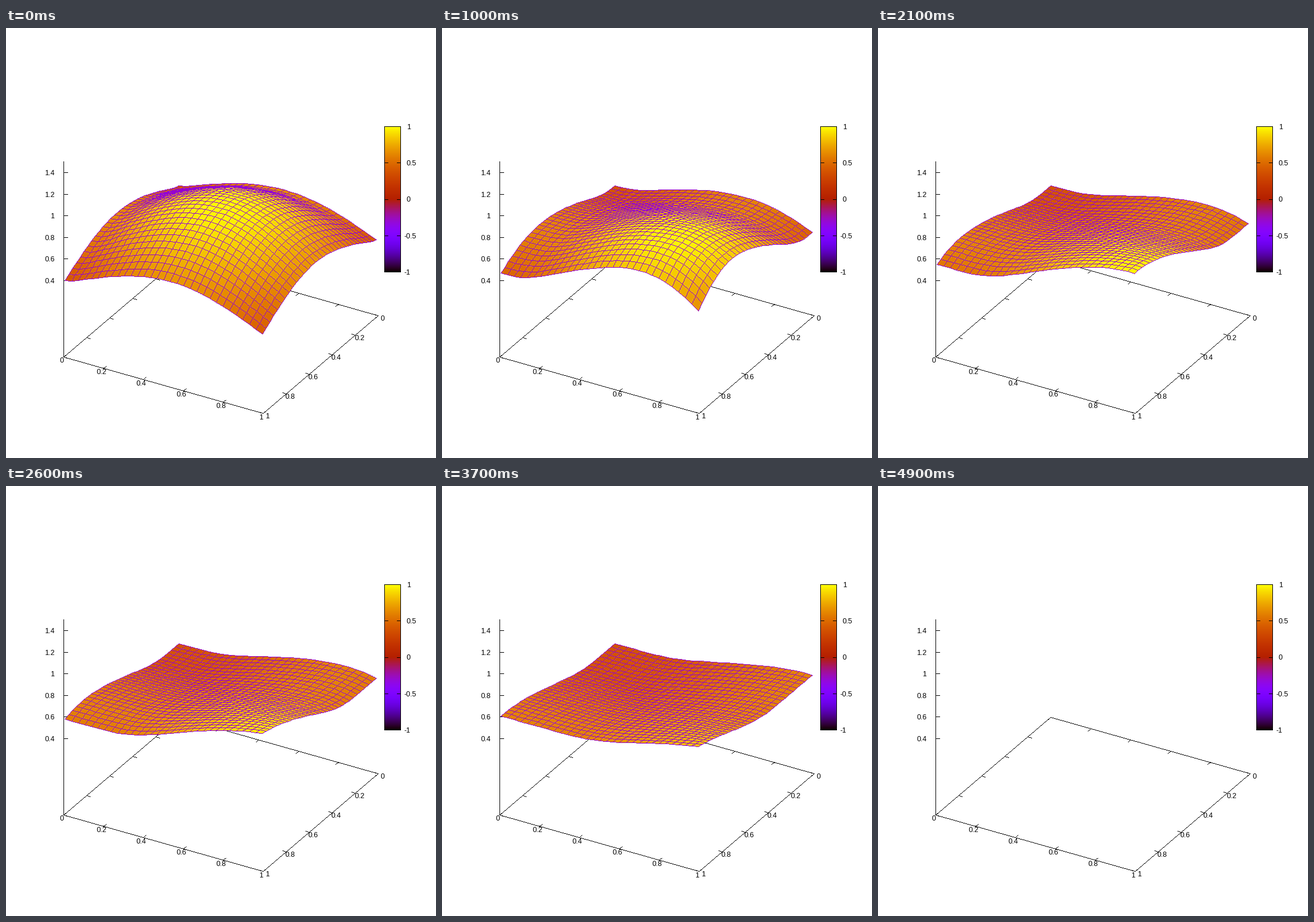
Animation of 748 by 748 pixels, one loop 5000 ms. Source, as a matplotlib script:

```python
import numpy as np
import matplotlib.pyplot as plt
from matplotlib.animation import FuncAnimation
from matplotlib.collections import PathCollection
from matplotlib.patches import PathPatch
from matplotlib.path import Path

SIZE, DPI = 748, 100
PX = 72 / DPI
FRAMES, INTERVAL = 50, 100

# Oblique view: screen position of the base corner and of the unit vectors
ORIGIN = np.array([300.4, 402.0])
X_VEC = np.array([346.9, 98.1])
Y_VEC = np.array([-200.3, 170.0])
Z_BASE, Z_SCALE = -0.308, 187.8

CELLS, DX, DT = 30, 0.033, 0.02
LEAD_STEPS = 2
MESH_COLOR = (148 / 255, 0, 211 / 255)

SQUARE = 0.3 * np.array([[-1, -1], [1, -1], [1, 1], [-1, 1], [-1, -1]])
SQUARE_CODES = [Path.MOVETO] + [Path.LINETO] * 3 + [Path.CLOSEPOLY]


def project(x, y, z=Z_BASE):
    x, y, z = np.broadcast_arrays(x, y, z)
    point = ORIGIN + x[..., None] * X_VEC + y[..., None] * Y_VEC
    point[..., 1] -= (z - Z_BASE) * Z_SCALE
    return point


def palette(value):
    """Black - violet - red - yellow ramp over -1..1."""
    t = np.clip((np.asarray(value) + 1) / 2, 0, 1)
    blue = np.clip(np.sin(2 * np.pi * t), 0, 1)
    return np.stack([np.sqrt(t), t**3, blue], axis=-1)


def advance(u):
    """One upwind step of the two-dimensional Burgers equation."""
    slope = np.diff(u, axis=0, prepend=u[:1]) + np.diff(u, axis=1, prepend=u[:, :1])
    return u - DT / DX * u * slope


def trace(start, end):
    """Whole pixels on straight lines, with a mask of the ones in use."""
    start, end = np.rint(start), np.rint(end)
    span = np.abs(end - start).max(axis=-1)[..., None]
    steps = np.arange(int(span.max()) + 1)
    t = np.minimum(steps / np.maximum(span, 1), 1)[..., None]
    pixels = np.rint(start[..., None, :] + t * (end - start)[..., None, :])
    return pixels, steps <= span


def pixel_path(pixels):
    squares = pixels[:, None, :] + SQUARE
    return Path(squares.reshape(-1, 2), SQUARE_CODES * len(pixels))


def cell_corners(a):
    return np.stack([a[:-1, :-1], a[1:, :-1], a[1:, 1:], a[:-1, 1:]], axis=2)


coords = np.arange(CELLS + 1) * DX
gx, gy = np.meshgrid(coords, coords, indexing="ij")
center = coords[CELLS // 2]
state = np.exp(-2 * ((gx - center) ** 2 + (gy - center) ** 2))
states = []
for _ in range(LEAD_STEPS + FRAMES - 1):
    state = advance(state)
    states.append(state)
states = states[LEAD_STEPS:]

# Paint cells from back to front
depth = cell_corners(project(gx, gy)[..., 1]).mean(axis=2).ravel()
order = np.argsort(depth, kind="stable")

fig = plt.figure(figsize=(SIZE / DPI, SIZE / DPI), dpi=DPI, facecolor="white")
ax = fig.add_axes([0, 0, 1, 1])
ax.axis("off")


def line(*points, zorder=1):
    points = np.array(points, dtype=float)
    pixels, used = trace(points[:-1], points[1:])
    ax.add_patch(PathPatch(pixel_path(pixels[used]), facecolor="black", linewidth=0,
                           antialiased=False, snap=False, zorder=zorder))


def label(x, y, text, align="center"):
    ax.text(x, y + 4.5, text, ha=align, va="baseline", color="black",
            family="Liberation Sans", size=12.5 * PX, zorder=5)


def tick(start, direction, length):
    line(start, start + direction / np.hypot(*direction) * length)


def draw_axes():
    back, right, front, left = project(np.array([0, 1, 1, 0]), np.array([0, 0, 1, 1]))
    line(back, right, front, left, back)
    line(left, project(0, 1, 1.5))
    for k in range(6):
        v = k / 5
        near, far = project(v, 1), project(v, 0)
        tick(near, -Y_VEC, 6)
        tick(far, Y_VEC, 6)
        label(near[0] - 4, near[1] + 5.5, f"{v:g}")
        near, far = project(1, v), project(0, v)
        tick(near, -X_VEC, 6.5)
        tick(far, X_VEC, 6.5)
        label(near[0] + 7, near[1] + 3.5, f"{v:g}")
    for z in np.arange(0.4, 1.5, 0.2):
        x, y = project(0, 1, z)
        line((x, y), (x + 7, y))
        label(84, y, f"{z:g}", "right")


def draw_colorbar():
    x0, x1, top, bottom = 658, 686, 171, 424
    ramp = palette(np.linspace(1, -1, 256))[:, None, :]
    ax.imshow(ramp, extent=(x0, x1, bottom, top), aspect="auto", zorder=1)
    line((x0, top), (x1, top), (x1, bottom), (x0, bottom), (x0, top), zorder=3)
    for v in (-1, -0.5, 0, 0.5, 1):
        y = bottom + (top - bottom) * (v + 1) / 2
        line((x0, y), (x0 + 6, y), zorder=3)
        line((x1 - 6, y), (x1, y), zorder=3)
        label(692.5 if v < 0 else 696.5, y, f"{v:g}", "left")


draw_axes()
draw_colorbar()
ax.set_xlim(-0.5, SIZE - 0.5)
ax.set_ylim(SIZE - 0.5, -0.5)

# Smooth cell faces alternate with their crisp outlines
surface = PathCollection([], linewidths=0, edgecolors="none",
                         antialiaseds=[True, False], zorder=2)
surface.set_snap(False)
ax.add_collection(surface, autolim=False)


def update(frame):
    # The surface vanishes for the last moment of the loop
    surface.set_visible(frame < len(states))
    if frame < len(states):
        u = states[frame]
        quads = cell_corners(project(gx, gy, u)).reshape(-1, 4, 2)[order]
        pixels, used = trace(quads[:, [0, 3, 0, 1]], quads[:, [1, 2, 3, 2]])
        paths = []
        for quad, dots, mask in zip(quads, pixels, used):
            paths += [Path(quad), pixel_path(dots[mask])]
        colors = np.empty((len(paths), 3))
        colors[::2] = palette(cell_corners(u).mean(axis=2).ravel()[order])
        colors[1::2] = MESH_COLOR
        surface.set_paths(paths)
        surface.set_facecolor(colors)
    return (surface,)


anim = FuncAnimation(fig, update, frames=FRAMES, interval=INTERVAL,
                     repeat=True, repeat_delay=0, blit=False)
plt.show()
```
